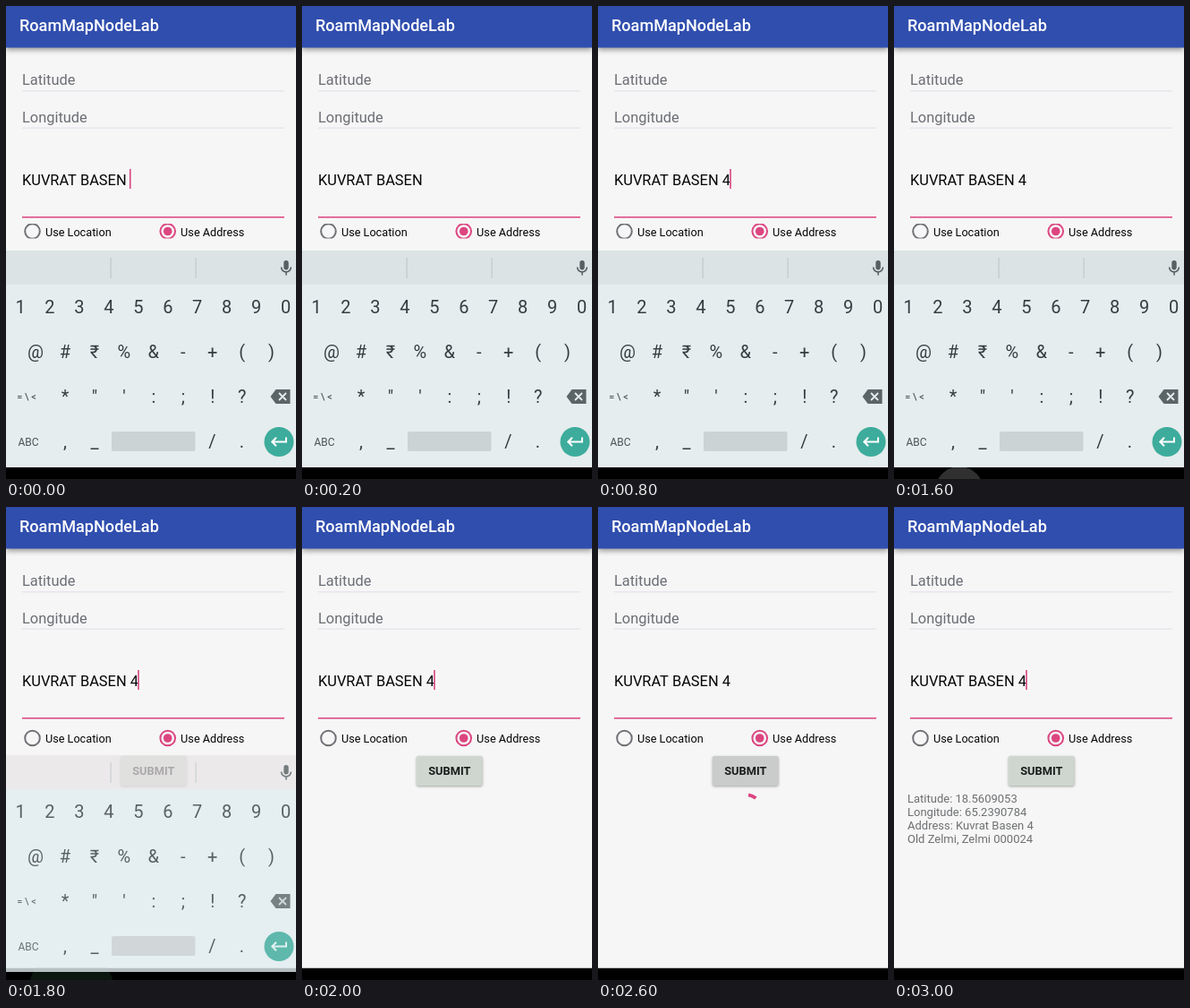
These frames come from a looping animation (324x528 px, 3.2 s). An HTML page with a canvas:

```html
<!DOCTYPE html>
<html lang="en">
<head>
<meta charset="utf-8">
<title>Geocoding form</title>
<style>
html, body { margin: 0; width: 100%; height: 100%; overflow: hidden; background: #f6f6f6; }
canvas { display: block; width: 324px; height: 528px; }
</style>
</head>
<body>
<canvas id="stage"></canvas>
<script>
const W = 324, H = 528, LOOP = 3200, NAV = 514.7;
const PINK = '#dc4580', INK = '#060606', HINT = '#6c6e75', KEY = '#343d40';
const PLACE = 'KUVRAT BASEN';
const RESULT = [
  'Latitude: 18.5609053',
  'Longitude: 65.2390784',
  'Address: Kuvrat Basen 4',
  'Old Zelmi, Zelmi 000024'
];

const canvas = document.getElementById('stage');
const ctx = canvas.getContext('2d');
const ratio = window.devicePixelRatio || 1;
canvas.width = W * ratio;
canvas.height = H * ratio;
ctx.scale(ratio, ratio);

function text(str, x, y, size, color, { weight = 400, align = 'left' } = {}) {
  ctx.font = `${weight} ${size}px Roboto, sans-serif`;
  ctx.textAlign = align;
  ctx.fillStyle = color;
  ctx.fillText(str, x, y);
}

function rect(x, y, w, h, color, r = 0) {
  ctx.fillStyle = color;
  ctx.beginPath();
  ctx.roundRect(x, y, w, h, r);
  ctx.fill();
}

function disc(x, y, r, color) {
  ctx.fillStyle = color;
  ctx.beginPath();
  ctx.arc(x, y, r, 0, Math.PI * 2);
  ctx.fill();
}

function stroke(color, width, path) {
  ctx.strokeStyle = color;
  ctx.lineWidth = width;
  ctx.beginPath();
  path();
  ctx.stroke();
}

function polyline(points) {
  points.forEach(([x, y], i) => i ? ctx.lineTo(x, y) : ctx.moveTo(x, y));
}

function shadowed(blur, dy, alpha, draw) {
  ctx.save();
  ctx.shadowColor = `rgba(0,0,0,${alpha})`;
  ctx.shadowBlur = blur * ratio;
  ctx.shadowOffsetY = dy * ratio;
  draw();
  ctx.restore();
}

function header() {
  shadowed(6, 2, 0.4, () => rect(0, -4, W, 50.5, '#304eae'));
  text('RoamMapNodeLab', 15, 28, 18.1, '#fff', { weight: 500 });
}

function form(value, caret) {
  text('Latitude', 18, 87.7, 16.4, HINT);
  text('Longitude', 18, 129.7, 16.4, HINT);
  rect(18, 94, 293, 1.5, '#ebe5ee');
  rect(18, 135.5, 293, 1.5, '#ebe5ee');
  text(value, 18, 200, 16.4, INK);
  if (caret) rect(17.3 + ctx.measureText(value).width, 182, 1.6, 22, PINK);
  rect(18, 235, 293, 1.6, PINK);
}

function radio(x, y, label, on) {
  const color = on ? PINK : '#707276';
  stroke(color, 2, () => ctx.arc(x, y, 8.3, 0, Math.PI * 2));
  if (on) disc(x, y, 4.8, color);
  text(label, x + 14.4, y + 5, 12.7, INK);
}

function radios(squeezed) {
  const y = squeezed ? 251.5 : 258;
  ctx.save();
  if (squeezed) {
    ctx.beginPath();
    ctx.rect(0, 243, W, 16.5);
    ctx.clip();
  }
  radio(29.5, y, 'Use Location', false);
  radio(180.7, y, 'Use Address', true);
  ctx.restore();
}

function submit(pressed) {
  shadowed(3, 1, 0.35, () =>
    rect(128, 278, 73.5, 33, pressed ? '#c9cccb' : '#cfd6cf', 2));
  text('SUBMIT', 164.8, 299.2, 12.8, '#181b1a', { weight: 600, align: 'center' });
}

function spinner(from, to) {
  const rad = deg => (deg - 90) * Math.PI / 180;
  stroke(PINK, 3.8, () => ctx.arc(165.3, 338.7, 17.5, rad(from), rad(to)));
}

function keyRow(keys, x, y) {
  [...keys].forEach((k, i) => text(k, x + i * 32.95, y, 20, KEY, { align: 'center' }));
}

function mic(x, y) {
  const color = '#566063';
  rect(x - 2.7, y - 8, 5.4, 10.5, color, 2.7);
  stroke(color, 1.6, () => {
    ctx.arc(x, y - 0.5, 5.4, 0, Math.PI);
    ctx.moveTo(x, y + 5);
    ctx.lineTo(x, y + 8.5);
  });
}

function backspace(x, y) {
  ctx.fillStyle = '#5b6467';
  ctx.beginPath();
  polyline([[x - 11, y], [x - 5, y - 8], [x + 11, y - 8], [x + 11, y + 8], [x - 5, y + 8]]);
  ctx.fill();
  stroke('#e5edee', 1.8, () => {
    polyline([[x - 1.5, y - 4], [x + 6.5, y + 4]]);
    polyline([[x + 6.5, y - 4], [x - 1.5, y + 4]]);
  });
}

function enter(x, y) {
  disc(x, y, 16.5, '#3dac9c');
  stroke('#fff', 2, () => {
    polyline([[x + 8, y - 5], [x + 8, y], [x - 7.5, y]]);
    polyline([[x - 3, y - 4.7], [x - 7.7, y], [x - 3, y + 4.7]]);
  });
}

function keyboard(leaving) {
  ctx.save();
  if (leaving) ctx.translate(0, 4);
  ctx.globalAlpha = leaving ? 0.7 : 1;
  rect(0, 273, W, 38, leaving ? '#e8e4e7' : '#dbe3e4');
  ctx.globalAlpha = leaving ? 0.8 : 1;
  rect(0, 311, W, 204, leaving ? '#e2edef' : '#e5edee');
  for (const x of [116.5, 211.5]) rect(x, 281, 1.2, 23, '#c1c9cb');
  mic(313, 292);

  keyRow('1234567890', 16, 343);
  keyRow('@#₹%&-+()', 33, 393);
  keyRow('*"\':;!?', 66, 443);
  text('= \\ <', 23, 440, 11, KEY, { align: 'center' });
  backspace(306.5, 436);
  text('ABC', 25, 491, 12, '#4c5558', { align: 'center' });
  keyRow(',_', 66, 493);
  rect(118, 475, 93.5, 22, '#ccd3d4', 2);
  keyRow('/.', 230.5, 493);
  enter(305, 486.5);
  ctx.restore();
}

function keyPopup() {
  const fill = ctx.createLinearGradient(0, 252, 0, 356);
  fill.addColorStop(0, '#ced6d7');
  fill.addColorStop(1, '#c8d1d2');
  shadowed(4, 1.5, 0.45, () => rect(92.5, 252, 45.5, 104, fill, 2));
  text('4', 115.5, 289.5, 30, '#2b3335', { align: 'center' });
  for (let i = 0; i < 3; i++) disc(125.5 + i * 4, 301, 1.2, '#858e90');
}

function navBar(ripple) {
  rect(0, NAV, W, H - NAV, '#000');
  if (!ripple) return;
  ctx.save();
  ctx.beginPath();
  ctx.rect(0, NAV, W, H - NAV);
  ctx.clip();
  disc(73, 541, ripple.r, ripple.color);
  ctx.restore();
}

function draw(t) {
  const between = (a, b) => t >= a && t < b;
  const typed = t >= 600;
  const open = t < 1800;
  const closing = between(1800, 2000);
  const caret = !(between(200, 600) || between(1600, 1800) || between(2400, 2800));

  rect(0, 0, W, H, '#f6f6f6');
  header();
  form(PLACE + (typed ? ' 4' : ' '), caret);
  radios(open);

  if (!open) submit(between(2400, 2800));
  if (between(2600, 2800)) spinner(9, 39);
  if (between(2800, 3000)) spinner(45, 200);
  if (t >= 3000) RESULT.forEach((line, i) => text(line, 15, 330 + i * 15, 13, '#6e7072'));

  navBar(between(1600, 1800) ? { r: 27, color: '#303030' }
    : closing ? { r: 48, color: '#0b160f' } : null);
  if (open || closing) keyboard(closing);
  if (between(600, 800)) keyPopup();
}

let start;
function tick(now) {
  start ??= now;
  draw((now - start) % LOOP);
  requestAnimationFrame(tick);
}
draw(0);
requestAnimationFrame(tick);
</script>
</body>
</html>
```
